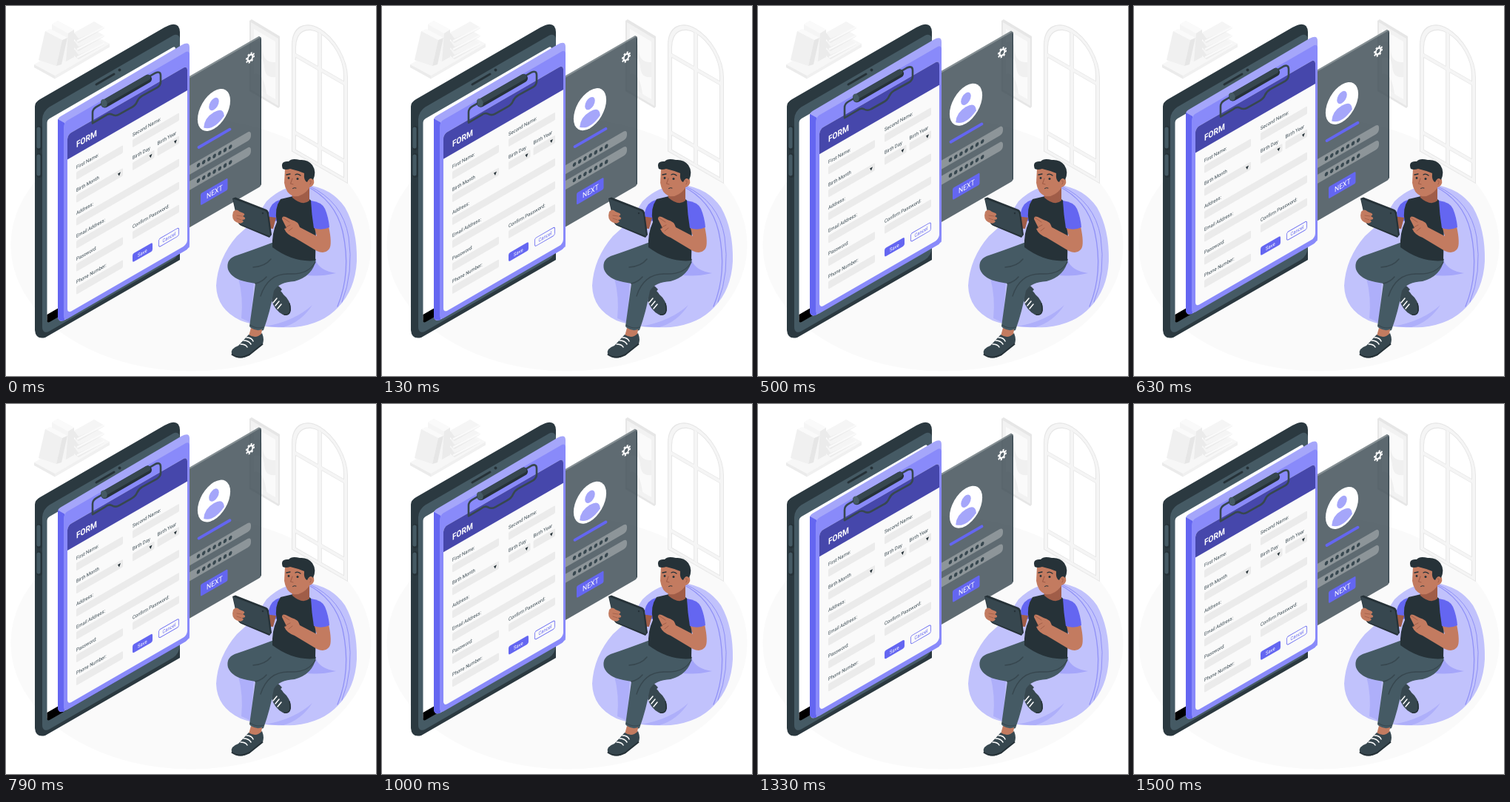
These frames come from a looping animation (500x500 px, 1540 ms). An HTML page with a canvas:

```html
<!DOCTYPE html>
<html lang="en">
<head>
<meta charset="utf-8">
<title>Form illustration</title>
<style>
html, body { margin: 0; width: 100%; height: 100%; overflow: hidden; background: #fff; }
canvas { display: block; width: 500px; height: 500px; }
</style>
</head>
<body>
<canvas id="stage"></canvas>
<script>
const canvas = document.getElementById('stage');
const ctx = canvas.getContext('2d');
const ratio = window.devicePixelRatio || 1;
canvas.width = canvas.height = 500 * ratio;

const LOOP = 1540, RISE = 9.5, LEAD = 20;
const COS = Math.cos(Math.PI / 6);
const BLUE = '#6466f1', LILAC = '#a5a6fa', SEAM = '#9091f6';
const INK = '#263238', SLATE = '#37474f', STEEL = '#455a64';
const SKIN = '#c37b60', SKIN_DARK = '#a05d48';

function fill(path, color) {
  ctx.fillStyle = color;
  ctx.fill(new Path2D(path));
}

function line(path, color, width = 1) {
  ctx.strokeStyle = color;
  ctx.lineWidth = width;
  ctx.lineCap = ctx.lineJoin = 'round';
  ctx.stroke(new Path2D(path));
}

function group(draw) {
  ctx.save();
  draw();
  ctx.restore();
}

// Draws on the wall plane that rises to the right at 30 degrees.
function iso(x, y, draw) {
  group(() => {
    ctx.transform(COS, -0.5, 0, 1, x, y);
    draw();
  });
}

function tile(x, y, w, h, r, color, outlined) {
  iso(x, y, () => {
    ctx.beginPath();
    ctx.roundRect(0, 0, w / COS, h, r);
    if (outlined) {
      ctx.strokeStyle = color;
      ctx.lineWidth = 0.9;
      ctx.stroke();
    } else {
      ctx.fillStyle = color;
      ctx.fill();
    }
  });
}

function label(text, x, y, size = 6.8, color = SLATE, weight = 400) {
  iso(x, y, () => {
    ctx.font = `${weight} ${size}px Roboto, sans-serif`;
    ctx.fillStyle = color;
    ctx.fillText(text, 0, 0);
  });
}

function disc(x, y, r, color) {
  ctx.fillStyle = color;
  ctx.beginPath();
  ctx.arc(x, y, r, 0, 2 * Math.PI);
  ctx.fill();
}

function drawShelf() {
  fill('M38 79 L112 36 L140 51 L66 94Z', '#f7f7f7');
  fill('M38 79 L66 94 V98.5 L38 83Z', '#ebebeb');
  fill('M66 94 L140 51 V55.5 L66 98.5Z', '#f0f0f0');
  fill('M62 25 L70 20 L92 32 V69 L81 75 L62 64Z', '#f5f5f5');
  fill('M62 25 L70 20 L92 32 L84 37Z', '#fafafa');
  fill('M84 37 L92 32 V69 L81 75Z', '#ebebeb');
  fill('M53 34 L60 31 L83 43 L75 79 L68 81 L44 73Z', '#fafafa');
  fill('M53 34 L76 46 L68 81 L44 73Z', '#f0f0f0');
  fill('M76 46 L83 43 L75 79 L68 81Z', '#e6e6e6');
  for (const y of [65, 54, 43]) {
    fill(`M92 ${y - 6} L120 ${y - 21} L133 ${y - 13} L98 ${y + 7} L92 ${y + 2}Z`, '#ebebeb');
    fill(`M92 ${y - 7} L119 ${y - 22} L133 ${y - 14} L98 ${y + 1}Z`, '#f5f5f5');
    line(`M97 ${y + 4} L132 ${y - 14}`, '#fafafa', 2.5);
  }
}

function drawPicture() {
  fill('M329 20 L332 18 L370 41 V136 L368 138 L329 115Z', '#e6e6e6');
  fill('M331 22 L368 44 V135 L331 113Z', '#f2f2f2');
  fill('M335 31 L364 48 V126 L335 109Z', '#fafafa');
  fill('M335 50 Q346 43 347 60 T364 76 V96 Q350 98 349 82 T335 70Z', '#f0f0f0');
  fill('M335 92 Q348 88 352 119 L335 109Z', '#f0f0f0');
}

function drawWindow() {
  const arch = inset => {
    const r = 38 - inset;
    ctx.beginPath();
    ctx.moveTo(inset, -inset);
    ctx.lineTo(inset, -144);
    ctx.ellipse(38, -144, r, r * 1.16, 0, Math.PI, 2 * Math.PI);
    ctx.lineTo(76 - inset, -inset);
    ctx.closePath();
  };
  group(() => {
    ctx.transform(1, 0.577, 0, 1, 386, 196.5);
    for (const [inset, color] of [[0, '#e6e6e6'], [1, '#f5f5f5'], [5, '#e6e6e6'], [6, '#fff']]) {
      arch(inset);
      ctx.fillStyle = color;
      ctx.fill();
    }
    arch(5);
    ctx.clip();
    for (const [width, color] of [[6, '#e6e6e6'], [4.5, '#f5f5f5']]) {
      line('M38 0 V-190 M5 -133 H71 M5 -28 H71', color, width);
    }
  });
}

function drawTablet() {
  fill('M39 136 Q39 130 46 126 L214 29 Q234 18 235 35 V343 L53 448 Q40 451 39 438Z', '#2b3940');
  tile(49, 142, 186, 303, 11, STEEL);
  tile(55.5, 154, 173.5, 274, 4, '#fff');
  tile(55.5, 417, 173.5, 12, [0, 0, 4, 4], '#000');
  line('M122 106 L146 92', INK, 3);
  disc(153.5, 86.5, 2, INK);
  for (const y of [166, 203]) {
    line(`M45 ${y} V${y + 25}`, INK, 8);
    line(`M44 ${y} V${y + 24}`, STEEL, 5);
  }
}

function drawGear() {
  iso(330, 70, () => {
    ctx.strokeStyle = '#fff';
    for (const [r, width, dash] of [[4, 2.4, []], [5.9, 2.2, [2.3, 5.9 * Math.PI / 4 - 2.3]]]) {
      ctx.beginPath();
      ctx.lineWidth = width;
      ctx.lineCap = 'butt';
      ctx.setLineDash(dash);
      ctx.arc(0, 0, r, 0, 2 * Math.PI);
      ctx.stroke();
    }
  });
}

function drawLogin() {
  group(() => {
    ctx.globalAlpha = 0.8;
    tile(238, 102, 107, 203, 4, SLATE);
  });
  line('M240 100.8 L342 42', '#858f93', 2.2);
  line('M344.3 45 V241', SLATE, 1.3);
  drawGear();
  iso(281, 140.5, () => {
    disc(0, 0, 25.5, '#fff');
    disc(0, -8, 7.8, LILAC);
    fill('M-16 16 Q-15 3 0 3 Q15 3 16 16 Q0 28 -16 16Z', LILAC);
  });
  line('M260.5 191 L302.5 166.7', BLUE, 3.8);
  for (const y of [215, 236]) {
    tile(240, y + 5.5, 91, 12, 5, '#8d9599');
    for (let i = 0; i < 7; i++) {
      iso(260 + i * 7.2, y - i * 4.1, () => disc(0, 0, 2.7, SLATE));
    }
  }
  tile(263, 253.5, 36.5, 16, 2, BLUE);
  label('NEXT', 271, 260.7, 10, '#fff');
}

function drawClip() {
  const wire = 'M117 157 V143 Q117 138 122 135 L202 89 Q209 86 209 93 V101 Q209 106 204 109 '
    + 'L184 120 Q179 123 177 128 Q175 133 169 136 L153 145 Q148 148 143 145 Q139 143 134 147 Z';
  line(wire, SLATE, 2.6);
  line('M133.5 130.5 L191.5 97', INK, 11);
  line('M134 128 L191.5 95', SLATE, 7.5);
  fill('M128 127 Q130 123 134 125 Q138 129 136 134 Q132 137 129 133Z', STEEL);
}

const rows = [
  [['First Name:', 95, 63], ['Second Name:', 171, 63]],
  [['Birth Month', 95, 63, true], ['Birth Day', 171, 29.5, true], ['Birth Year', 204.5, 29.5, true]],
  [['Address:', 95, 139]],
  [['Email Address:', 95, 139]],
  [['Password:', 95, 63], ['Confirm Password:', 171, 63]],
  [['Phone Number:', 95, 63]]
];

function drawForm() {
  fill('M70 155 Q70 151 74 149 L237 53 Q248 47 248 56 V326 L80 424 Q71 429 70 420Z', LILAC);
  fill('M70 153 L79 158 V425 Q70 427 70 420Z', BLUE);
  tile(78, 157.5, 170, 268, 6, '#898afa');
  tile(83, 174, 162, 241.5, 6, '#fafafa');
  tile(83, 174, 162, 33.5, [6, 6, 0, 0], '#4647ab');
  label('FORM', 95, 191.5, 11.7, '#fff', 700);

  rows.forEach((fields, i) => {
    for (const [text, x, width, menu] of fields) {
      const y = 220.5 + i * 31 - (x - 95) * 0.577;
      label(text, x, y);
      tile(x, y + 4, width, 10.5, 1.5, '#ebebeb');
      if (menu) {
        iso(x + width - 5, y + 9.5 - (width - 5) * 0.577, () => fill('M-2.3 -2 H2.3 L0 2.3Z', INK));
      }
    }
  });

  tile(171, 335, 27, 11.5, 2.5, BLUE);
  label('Save', 178, 339.5, 6.8, '#fff');
  tile(206.5, 315, 27, 11, 2.5, BLUE, true);
  label('Cancel', 211.5, 320, 6.8, BLUE);
  group(() => {
    ctx.translate(0, 1.5);
    drawClip();
  });
}

function drawBeanbag() {
  fill('M352 264 Q375 241 407 242 Q440 246 458 272 Q475 302 474 345 Q472 383 449 407 '
    + 'Q428 430 390 434 Q345 436 317 425 Q285 410 284 378 Q286 341 312 311 Q336 291 352 264Z', '#c1c2fc');
  line('M405 243 Q445 262 455 305 Q467 360 448 406', SEAM, 1.3);
  line('M409 243 Q455 264 463 312 Q470 360 454 400', SEAM, 1);
  fill('M418 343 Q424 358 446 361 Q420 367 402 363Z', LILAC);
  fill('M314 368 Q326 373 335 373 L331 428 L318 422 Q321 394 314 368Z', '#aeaffa');
  fill('M350 433 Q390 426 414 404 Q399 427 375 434Z', '#aeaffa');
}

function drawLegs() {
  fill('M361 388 Q369 379 375 390 Q385 398 385 411 Q382 420 374 417 Q363 411 359 398Z', SLATE);
  line('M383 402 Q387 419 376 417', INK, 1.6);
  line('M361 401 L366 395 M364 405 L369 399 M367 409 L372 403', '#fff', 1.5);
  fill('M354 374 Q366 374 373 383 L362 396 L348 386Z', SLATE);
  fill('M362 319 Q330 331 309 338 Q297 343 300 356 Q305 369 326 373 L337 375 '
    + 'Q333 404 329 433 Q337 443 348 438 Q357 413 362 385 Q369 373 390 372 Q415 365 419 342 L390 331Z', STEEL);
  line('M418 346 Q409 363 383 362 Q354 361 344 392', SLATE, 1.4);
  line('M334 353 Q350 352 358 342 M337 375 Q346 373 352 366', SLATE, 1.5);
  line('M330 431 Q338 437 348 434', SLATE, 1.2);
  fill('M331 435 Q339 440 346 437 L344 450 L328 446Z', SKIN);
  fill('M328 444 Q338 451 346 442 Q350 452 346 458 Q337 465 329 472 Q313 480 305 470 Q303 463 314 459Z', SLATE);
  line('M305.5 471 Q315 478 329 471 L346.5 457', INK, 2);
  line('M317 457 Q324 457 326 461 M321 452 Q328 452 331 457 M325 448 Q332 448 334 453', '#fff', 1.5);
}

function drawHead() {
  fill('M386 249 L410 243 V263 Q401 271 387 259Z', SKIN_DARK);
  fill('M377 220 Q395 212 410 225 L410 246 Q400 259 388 257 Q378 253 376 239Z', SKIN);
  fill('M407 234 Q413 229 416 235 Q418 243 408 246Z', SKIN);
  fill('M374 220 Q370 209 382 210 Q386 205 397 208 Q408 207 414 215 Q420 224 415 235 '
    + 'Q411 230 407 238 Q402 236 403 226 Q393 222 384 220 Q378 222 374 220Z', INK);
  disc(382, 232.5, 1.4, INK);
  disc(394, 233.5, 1.5, INK);
  line('M379 228 L384 227 M391 228 Q394 226 398 229', INK, 1.3);
  line('M387 233 L384.5 240 L388 241', SKIN_DARK, 1.1);
  line('M387.5 246.5 Q389.5 245 392 246', INK, 1);
  line('M410 236 Q414 235 411 241', SKIN_DARK, 0.9);
}

function drawBody() {
  fill('M370 262 Q358 265 355 279 L357 291 L370 290Z', BLUE);
  fill('M350 284 L365 286 L361 301 L346 300Z', SKIN_DARK);
  fill('M371 261 L388 257 Q399 269 410 261 L419 269 Q419 302 418 344 Q388 347 360 326 '
    + 'Q359 307 366 292 Q362 274 371 261Z', INK);
  drawHead();
  fill('M306 260 L310 258.5 L352 275 Q354 276 355 279 L359 309 L356 313 L318 297 Q314 295 313 291Z', INK);
  fill('M307 260.5 L350 277 Q352 278 353 281 L357 311 L317 295 Q314 293 313 290Z', SLATE);
  disc(347, 280, 1.2, INK);
  fill('M307 278 Q311 273 316 278 L321 280 Q324 282 320 284 L323 286 Q324 289 319 289 '
    + 'L321 291 Q318 296 311 292 Q304 288 307 278Z', SKIN);
  line('M312 283 L319 284 M312 287 L318 289', SKIN_DARK, 0.8);
  fill('M416 297 L436 298 Q441 321 437 328 Q431 336 420 331 L390 313 Q379 309 376 301 '
    + 'L379 300 L373 288 Q373 283 378 285 L386 289 Q395 291 397 299 L420 311Z', SKIN);
  line('M374 286 L383 292 M378 299 L384 296 M382 304 L387 300', SKIN_DARK, 0.9);
  fill('M412 263 Q427 265 431 274 Q436 286 437 299 Q427 304 416 300 Q413 282 412 263Z', BLUE);
}

function draw(time) {
  const phase = 2 * Math.PI * (time + LEAD) / LOOP;
  const lift = -RISE * (1 - Math.cos(phase)) / 2;
  ctx.setTransform(ratio, 0, 0, ratio, 0, 0);
  ctx.fillStyle = '#fff';
  ctx.fillRect(0, 0, 500, 500);
  ctx.fillStyle = '#fafafa';
  ctx.beginPath();
  ctx.ellipse(250, 323, 243.5, 170.5, 0, 0, 2 * Math.PI);
  ctx.fill();
  drawShelf();
  drawPicture();
  drawWindow();
  group(() => {
    ctx.translate(0, lift);
    drawLogin();
  });
  drawTablet();
  group(() => {
    ctx.translate(0, lift);
    drawForm();
  });
  drawBeanbag();
  drawLegs();
  drawBody();
}

const start = performance.now();
function tick() {
  draw((performance.now() - start) % LOOP);
  requestAnimationFrame(tick);
}
tick();
</script>
</body>
</html>
```
